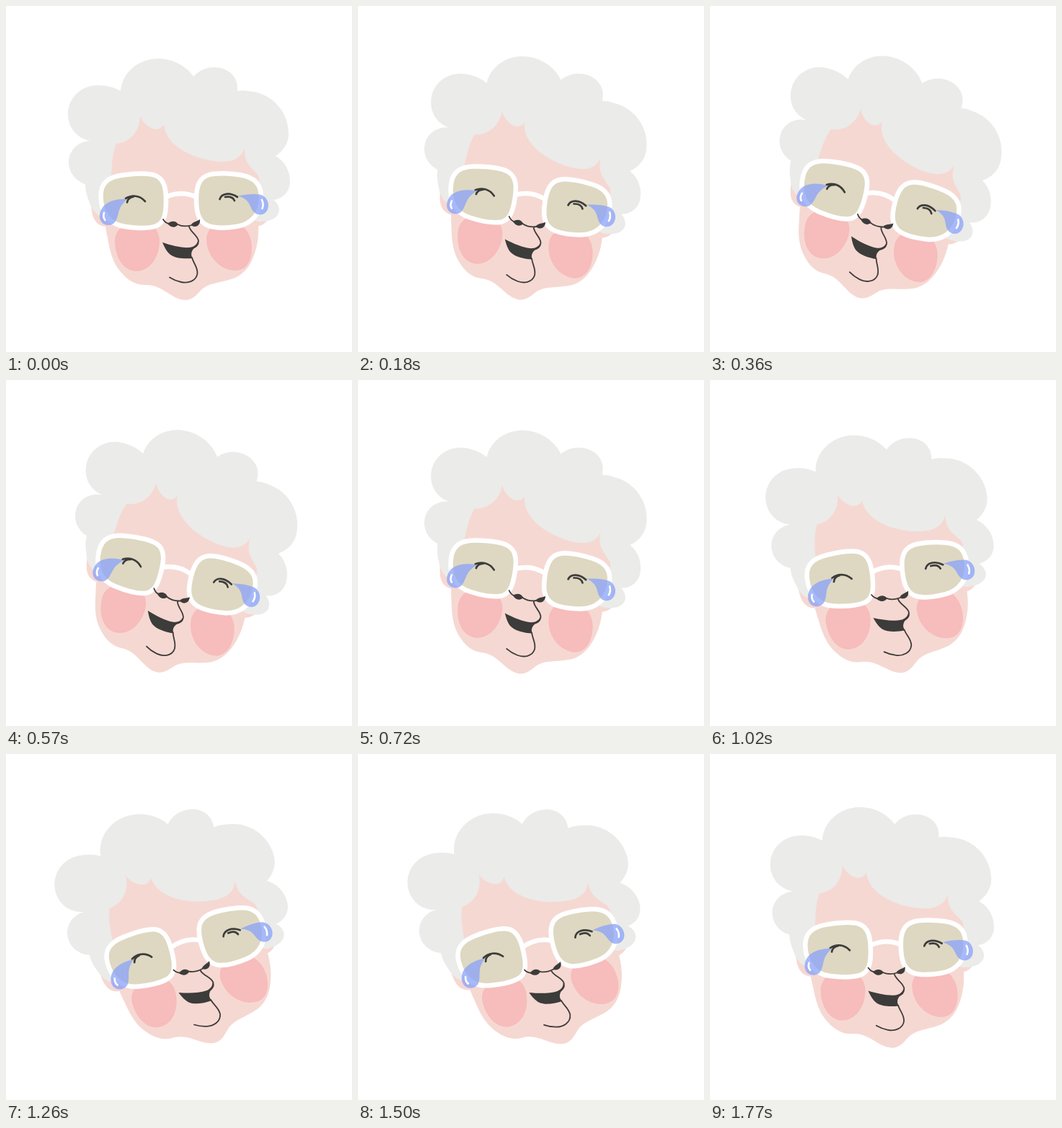
Write an HTML page that moves like this. It is 480 px wide and 480 px high and loops after 1.8 s.

```html
<!DOCTYPE html>
<html lang="en">
<head>
<meta charset="utf-8">
<title>Laughing grandma</title>
<style>
  html, body { margin: 0; width: 100%; height: 100%; overflow: hidden; background: #fff; }
  svg { display: block; width: 100vw; height: 100vh; }
  .skin { fill: #f6d8d2; }
  .hair { fill: #ebebe9; }
  .cheek { fill: #f7bcbc; }
  .lens { fill: #ded8c2; }
  .frame { stroke: #fff; stroke-width: 6.5; }
  .bridge { fill: none; }
  .ink { fill: #3c3c3a; }
  .line { fill: none; stroke: #3c3c3a; stroke-linecap: round; stroke-linejoin: round; }
  .eye { stroke-width: 2.7; }
  .thin { stroke-width: 1.8; }
  .tear { fill: #88a2f8; fill-opacity: .75; }
  .glint { fill: none; stroke: #fff; stroke-width: 2.6; stroke-linecap: round; }
</style>
</head>
<body>
<svg viewBox="0 0 480 480">
  <g id="head">
    <!-- ears and face -->
    <path class="skin" d="M118 276C119 290 122 304 138 306L150 280ZM366 290C363 299 358 304 348 306L340 285Z"/>
    <path class="skin" d="M186 145L150 190C146 210 146 232 140 260C135 285 137 305 141 322C144 340 148 354 156 365C165 377 176 386 190 387C208 386 216 393 226 399C235 405 242 408 250 408C261 407 266 398 273 392C285 383 300 384 318 377C331 371 339 360 344 346C349 332 351 320 350 300L352 240L335 190L260 150Z"/>
    <path class="cheek" d="M151 325C152 310 165 299 184 299C203 299 214 312 213 328C212 350 199 368 180 368C162 367 151 348 151 325Z"/>
    <path class="cheek" d="M278 323C279 308 291 299 308 299C328 299 341 314 341 336C341 354 333 367 318 367C297 367 278 347 278 323Z"/>

    <path class="hair" d="M159 118C161 92 184 73 211 73C231 73 250 83 260 98C268 89 278 85 289 85C307 85 321 97 321 113L321 118C326 117 331 117 336 118C368 120 392 146 392 177C392 189 386 200 374 208C386 215 394 228 394 243C394 257 385 267 371 269C376 272 379 278 379 284C378 293 368 300 350 299L342 297L353 262L351 236C338 222 330 216 331 197C326 213 312 216 299 216C262 214 221 195 219 164C217 168 213 171 208 171C199 171 187 159 186 152C186 173 173 189 153 191C148 205 147 215 146 238L130 262L133 292C125 290 119 282 116 273C112 263 110 256 110 247C97 243 87 231 87 217C87 201 99 188 117 187C99 184 86 169 86 150C86 128 104 110 127 110C140 110 151 113 159 118Z"/>

    <!-- glasses -->
    <path class="lens frame" d="M131.500 264C131 245 143 237 162 234.500C180 232 196 231 207 235C220 240 222 254 222 270C222 288 220 302 206 306C195 309 178 308 165 306C144 303 132 288 131.500 264Z"/>
    <path class="lens frame" d="M264 268C264 250 268 238 282 234C292 231 312 232 326 234.500C346 238 354 248 354 266C354 288 340 303 320 306C306 308 292 309 281 305C267 300 264 286 264 268Z"/>
    <path class="bridge frame" d="M222 265Q243 255.500 264 265"/>

    <!-- eyes -->
    <path class="line eye" d="M166 267C174 262 185 262 193 271M177 264.500Q169 266 168 272.500"/>
    <path class="line eye" d="M296.500 268C299 260 310 258 321 265M304 265Q314 263 317 270"/>

    <!-- nose, mouth, chin -->
    <path class="ink" d="M224 302C230 297 236 298 239 303C235 308 229 308 224 302ZM257 303C260 299 265 299 269 296C270 303 265 308 258 305Z"/>
    <path class="line thin" d="M218 296Q221 301 226 302M238 303C244 306 251 306 258 304M254 306C256 314 266 318 267 326C267 332 263 335 258 336"/>
    <path class="ink" d="M217 328C229 332 244 336 255 335C261 334 265 331 266 326C268 329 265 334 260 337C257 341 256 345 259 350C247 351 235 350 228 345C223 341 220 335 217 328Z"/>
    <path class="line thin" d="M258 349C260 357 266 362 265.500 371C264 382 252 385 243 383Q234 381 227 376.500"/>

    <!-- tears -->
    <path class="tear" d="M168 268C157 267 143 270 136 277C130 283 128 293 132 299C136 305 146 306 151 300C156 294 155 284 160 277Q163 272 168 268Z"/>
    <path class="tear" d="M322 263.500C333 261 345 260 354 262C362 265 366 274 363 282C360 290 350 292 344 286C339 281 339 274 333 269Q328 265 322 263.500Z"/>
    <path class="glint" d="M136 287Q134 293 137.500 297M355 269Q358 275 355.500 281"/>
  </g>
</svg>
<script>
  const LOOP = 1800;
  const SWING = 15;
  const head = document.getElementById('head');

  function draw(time) {
    const angle = SWING * Math.sin(2 * Math.PI * time / LOOP);
    head.setAttribute('transform', `rotate(${angle.toFixed(3)} 240 240)`);
  }

  let start;
  function tick(now) {
    start ??= now;
    draw((now - start) % LOOP);
    requestAnimationFrame(tick);
  }

  draw(0);
  requestAnimationFrame(tick);
</script>
</body>
</html>
```
